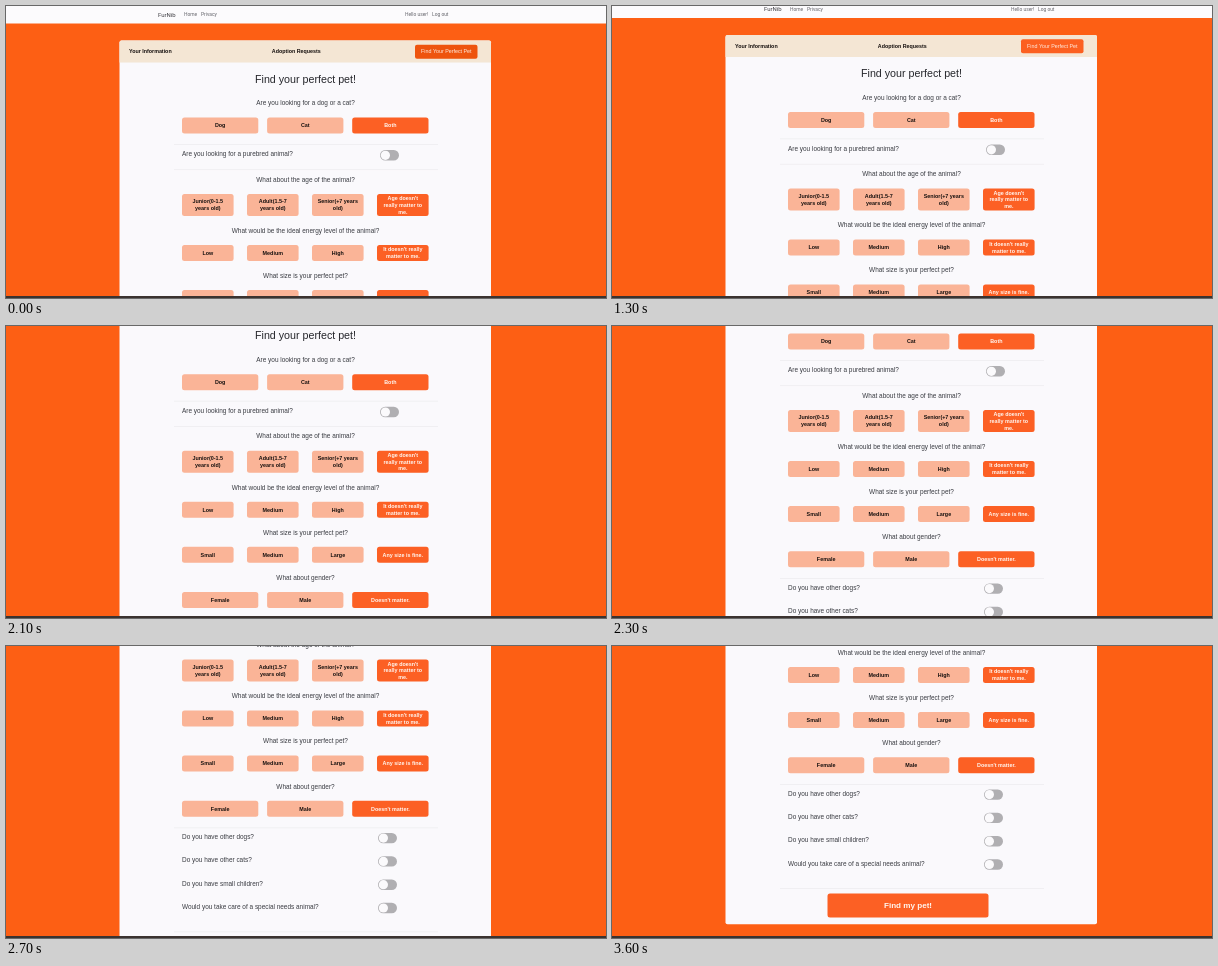
These frames come from a looping animation (600x292 px, 3.7 s). An HTML page with a canvas:

```html
<!DOCTYPE html>
<html lang="en">
<head>
<meta charset="utf-8">
<title>Pet finder form</title>
<style>
html, body { margin: 0; width: 100%; height: 100%; overflow: hidden; background: #fd5f14; }
canvas { display: block; width: 600px; height: 292px; }
</style>
</head>
<body>
<canvas id="stage"></canvas>
<script>
const W = 600, H = 292, LOOP = 3700, STEP = 100;
const canvas = document.getElementById('stage');
const ctx = canvas.getContext('2d');
const dpr = window.devicePixelRatio || 1;
canvas.width = W * dpr;
canvas.height = H * dpr;

const SANS = '"Liberation Sans", Arial, sans-serif';
const NAV = 'Roboto, "Liberation Sans", sans-serif';
const ORANGE = '#fd5f14', PICKED = '#fc6024', PEACH = '#fab497';
const INK = '#17110f', GREY = '#3a3c42';

// Scroll offset every 100 ms, starting at SCROLL_FROM
const SCROLL_FROM = 1200;
const SCROLL = [0, 5.5, 19, 28, 31.3, 33, 43, 56, 62, 63.3,
                80, 104, 126, 146, 163, 174.5, 191, 206, 215, 218];

function scrollAt(t) {
  const i = Math.round((t - SCROLL_FROM) / STEP);
  return SCROLL[Math.max(0, Math.min(SCROLL.length - 1, i))];
}

function box(x, y, w, h, r, fill) {
  ctx.fillStyle = fill;
  ctx.beginPath();
  ctx.roundRect(x, y, w, h, r);
  ctx.fill();
}

function text(str, x, y, size, { color = GREY, weight = 400, align = 'center', font = SANS } = {}) {
  ctx.font = `${weight} ${size}px ${font}`;
  ctx.fillStyle = color;
  ctx.textAlign = align;
  ctx.fillText(str, x, y + size * 0.35);
}

function button(x, y, w, h, label, picked) {
  box(x, y, w, h, 2.5, picked ? PICKED : PEACH);
  const lines = label.split('\n');
  const gap = lines.length > 2 ? 6.7 : 7;
  lines.forEach((line, i) => {
    const ly = y + h / 2 + (i - (lines.length - 1) / 2) * gap;
    text(line, x + w / 2, ly, 5.4, { weight: 700, color: picked ? '#fff6f0' : INK });
  });
}

// A row of choices; the last one is selected
function choices(y, h, labels) {
  const wide = labels.length === 3;
  labels.forEach((label, i) => {
    button(176 + i * (wide ? 85.1 : 65), y, wide ? 76.3 : 51.6, h, label, i === labels.length - 1);
  });
}

function toggle(x, y) {
  box(x, y - 5.2, 19, 10.4, 5.2, '#b0afb2');
  ctx.fillStyle = '#fbfafc';
  ctx.beginPath();
  ctx.arc(x + 5.4, y, 4.6, 0, Math.PI * 2);
  ctx.fill();
}

function rule(y) {
  ctx.fillStyle = '#eeedf0';
  ctx.fillRect(168, y, 264, 0.8);
}

function navBar() {
  ctx.fillStyle = '#fcfbfd';
  ctx.fillRect(0, 0, W, 17.5);
  const opt = { font: NAV, align: 'left', color: '#63636a' };
  text('FurNib', 152, 8.5, 6, { ...opt, color: '#3d3d42' });
  text('Home', 178, 8.5, 4.9, opt);
  text('Privacy', 195, 8.5, 4.9, opt);
  text('Hello user!', 399, 8.5, 4.9, opt);
  text('Log out', 426, 8.5, 4.9, opt);
}

function tabs(hover) {
  box(113.5, 34.5, 371.5, 22, [2, 2, 0, 0], '#f4e6d4');
  const bold = { weight: 700, color: INK };
  text('Your Information', 123, 45.5, 5.35, { ...bold, align: 'left' });
  text('Adoption Requests', 290.3, 45.5, 5.35, bold);
  const mix = (a, b) => Math.round(a + (b - a) * hover);
  box(409, 38.8, 62.5, 14, 2, `rgb(${mix(252, 238)},${mix(96, 84)},${mix(32, 14)})`);
  text('Find Your Perfect Pet', 440.3, 45.5, 5.33, { color: '#ffeee4' });
}

function form() {
  text('Find your perfect pet!', 299.5, 73, 10.7, { color: '#25262b' });

  text('Are you looking for a dog or a cat?', 299.5, 97, 6.45);
  choices(111.5, 16, ['Dog', 'Cat', 'Both']);
  rule(138);
  text('Are you looking for a purebred animal?', 176, 148, 6.45, { align: 'left' });
  toggle(374, 149.3);
  rule(163.3);

  text('What about the age of the animal?', 299.5, 173.5, 6.45);
  choices(188, 22, ['Junior(0-1.5\nyears old)', 'Adult(1.5-7\nyears old)',
    'Senior(+7 years\nold)', "Age doesn't\nreally matter to\nme."]);

  text('What would be the ideal energy level of the animal?', 299.5, 224.7, 6.45);
  choices(239, 16, ['Low', 'Medium', 'High', "It doesn't really\nmatter to me."]);

  text('What size is your perfect pet?', 299.5, 269.7, 6.45);
  choices(284, 16, ['Small', 'Medium', 'Large', 'Any size is fine.']);

  text('What about gender?', 299.5, 314.8, 6.45);
  choices(329.2, 16, ['Female', 'Male', "Doesn't matter."]);
  rule(356);

  ['Do you have other dogs?', 'Do you have other cats?', 'Do you have small children?',
    'Would you take care of a special needs animal?'].forEach((q, i) => {
    const y = 365.4 + i * 23.3;
    text(q, 176, y, 6.45, { align: 'left' });
    toggle(372, y + 1.2);
  });
  rule(460);

  box(215.5, 465.5, 161, 24, 2.5, PICKED);
  text('Find my pet!', 296, 477.5, 8.1, { weight: 700, color: '#fff6f0' });
}

function draw(t) {
  ctx.setTransform(dpr, 0, 0, dpr, 0, 0);
  ctx.fillStyle = ORANGE;
  ctx.fillRect(0, 0, W, H);

  ctx.save();
  ctx.translate(0, -scrollAt(t));
  navBar();
  box(113.5, 34.5, 371.5, 461.8, 2, '#faf9fc');
  tabs(Math.max(0, Math.min(1, (300 - t) / 300)));
  form();
  ctx.restore();

  ctx.fillStyle = '#3b3330';
  ctx.fillRect(0, 290, W, 2);
}

const start = performance.now();
function tick() {
  const t = (performance.now() - start) % LOOP;
  draw(Math.floor(t / STEP) * STEP);
  requestAnimationFrame(tick);
}
tick();
</script>
</body>
</html>
```
